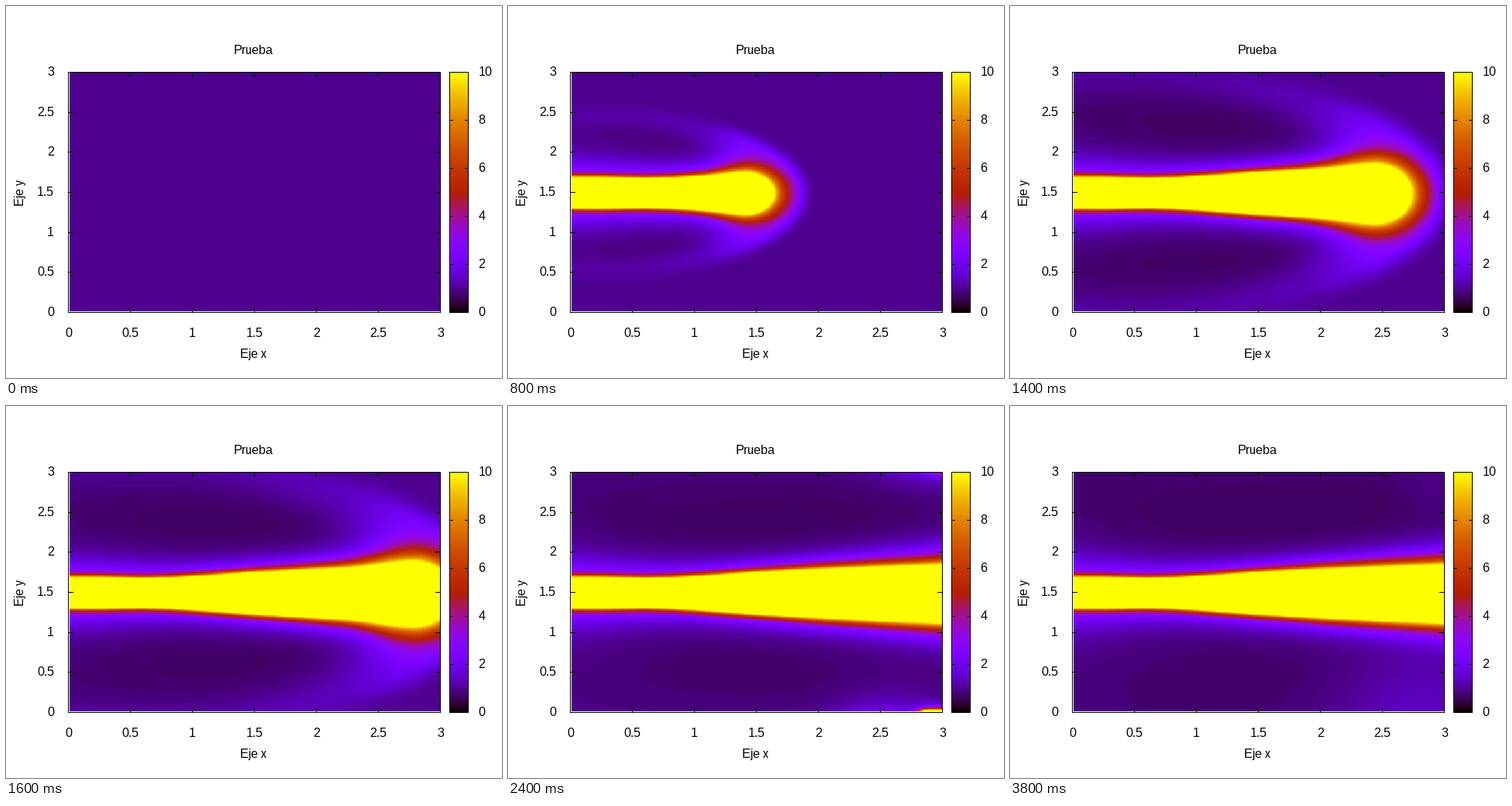
Recreate the animation shown at these times as a matplotlib script. Size 640x480 px, loop 4 s.

```python
import numpy as np
import matplotlib.pyplot as plt
from matplotlib.animation import FuncAnimation
from matplotlib.colors import ListedColormap

FRAMES, STEP = 20, 200
CELLS = 199
LEFT, RIGHT, TOP, BOTTOM = 80.5, 560.5, 85.5, 395.5
X0, X1, Y0, Y1 = 82, 560, 86, 394

plt.rcParams["font.family"] = "Liberation Sans"
plt.rcParams["text.hinting"] = "native"
plt.rcParams["text.hinting_factor"] = 1

# Black, violet, red, yellow: r = sqrt(v), g = v^3, b = sin(2 pi v)
level = np.linspace(0, 1, 128)
blue = np.clip(np.sin(2 * np.pi * level), 0, 1)
cmap = ListedColormap(np.column_stack([np.sqrt(level), level**3, blue]))

mid = (np.arange(CELLS) + 0.5) / CELLS
x, y = np.meshgrid(mid * (X1 - X0), Y0 + mid * (Y1 - Y0))
side = y - (240.8 + x / 300)
dy = np.abs(side)


def smooth(t):
    t = np.clip(t, 0, 1)
    return t * t * (3 - 2 * t)


def bump(u, width):
    return np.exp(-(u / width) ** 2)


def jet_width(px):
    return np.interp(px, [0, 40, 95, 130, 160, 240, 320, 400, 478],
                     [20.3, 20.3, 19.3, 20, 21.5, 27, 31.5, 35, 38])


def corners(n):
    """Wall flare on the outflow side and the slow glow that follows it."""
    to_right = (X1 - X0) - x
    from_top, from_bottom = y - Y0, Y1 - y
    flare = bump(n - 11.8, 1.1)
    low = 16 * np.exp(-from_bottom / 3) / (1 + np.exp((to_right - 27) / 4))
    low += 1.1 * np.exp(-from_bottom / 18) * bump(x - 410, 70)
    high = 3 * np.exp(-from_top / 3) * bump(to_right, 18)
    high += 1.2 * np.exp(-from_top / 16) * bump(to_right, 80)
    late = smooth((n - 11) / 5)
    glow = 0.65 * bump(x - 450, 110) * bump(from_bottom - 10, 65)
    top_y = 135 - 10 * (n - 16)
    top_amp = 0.45 - 0.08 * max(n - 16, 0)
    glow += top_amp * bump(to_right, 60) * bump(y - top_y, 45)
    return flare * (low + high) + late * glow


def field(n):
    if n == 0:
        return np.ones_like(x)
    # Bow shock: half ellipse that grows ahead of the jet
    front = 62.5 * n + 61 * (1 - np.exp(-1.5 * n))
    half = 21 * n + 35 * (1 - np.exp(-1.9 * n))
    start = 10 * n
    u = np.maximum(x - start, 0) / (front - start)
    q = np.hypot(u, dy / half)
    ahead = u / np.maximum(q, 1e-6)

    # Jet with a swollen, rounded head
    cap = 24 + 3.6 * n
    head = front - (20 * np.sqrt(n) + 9) - cap
    swell = 0.09 * n * n
    spread = 18 + 4.5 * n
    height = jet_width(head) + swell
    near = np.where(x > head, 1, bump(x - head, spread))
    body = dy - jet_width(x) - swell * bump(x - head, spread)
    nose = np.hypot((x - head) * height / cap, dy) - height
    d = np.maximum(np.where(x > head, nose, body), 0)

    # Cocoon around the jet
    late = smooth((n - 6) / 8)
    inner = 0.53 + (0.1 + 0.1 * late) * np.exp(-x / 140)
    inner = inner + 0.1 * late * smooth((side - 30) / 60)
    outer = np.interp(n, [8, 12, 16], [0.97, 0.92, 0.8])
    reach = min(0.9 * half, 170)
    behind = np.where(x > head, 1, bump(x - head, 1.7 * spread))
    mix = np.maximum(behind, np.minimum((dy / reach) ** 3, 1))
    base = inner + (outer - inner) * mix

    # Shocked shell, fading once it has left the box
    fade = np.clip((12 - n) / 4, 0, 1)
    base += fade * (0.25 + 0.9 * ahead**2) * bump(q - 0.86, 0.16)

    # Steep skin and soft halo, 10 at the jet's edge
    steady = 3 + 7 * (x / (X1 - X0)) ** 2
    steep = steady + near * np.maximum(7 + 0.14 * n * n - steady, 0)
    soft = 20 - 5 * np.sin(np.pi * x / (X1 - X0)) * (1 - near)
    v = base + (10 - base) * (0.33 * np.exp(-d / soft)
                              + 0.67 * np.exp(-d / steep))
    edge = smooth((1.02 - q) / (0.28 - 0.16 * ahead))
    return 1 + (v - 1) * edge + corners(n)


fig = plt.figure(figsize=(8, 6), dpi=80, facecolor="white")
ax = fig.add_axes([0, 0, 1, 1])


def line(xs, ys):
    ax.plot(xs, ys, color="black", lw=0.9, solid_capstyle="projecting",
            solid_joinstyle="miter", snap=False, zorder=3)


def frame(l, r, t, b):
    line([l, r, r, l, l], [t, t, b, b, t])


def label(px, py, text, ha="center", **kw):
    ax.text(px, py, text, ha=ha, va="baseline", fontsize=14.4,
            color="black", **kw)


def picture(data, extent):
    return ax.imshow(data, cmap=cmap, vmin=0, vmax=10, extent=extent,
                     interpolation="nearest", aspect="auto", zorder=1)


image = picture(np.ones_like(x), (X0, X1, Y1, Y0))
ramp = np.linspace(10, 0, 310)[:, None]
picture(ramp, (572, 597, 396, 85))
ax.set_xlim(0, 640)
ax.set_ylim(480, 0)
ax.axis("off")

frame(LEFT, RIGHT, TOP, BOTTOM)
frame(572.5, 596.5, TOP, BOTTOM)

for k in range(7):
    name = f"{k / 2:g}"
    tx = LEFT + 80 * k
    ty = np.floor(BOTTOM - 310 / 6 * k) + 0.5
    line([tx, tx], [BOTTOM, BOTTOM - 6])
    line([tx, tx], [TOP, TOP + 6])
    line([LEFT, LEFT + 6], [ty, ty])
    line([RIGHT, RIGHT - 6], [ty, ty])
    label(tx, 427, name)
    label(62, ty + 4.5, name, ha="right")

for k in range(6):
    ty = BOTTOM - 62 * k
    line([572.5, 576.5], [ty, ty])
    line([596.5, 592.5], [ty, ty])
    label(609.5, ty + 4.5, str(2 * k), ha="left")

label(319, 62, "Prueba")
label(319, 454, "Eje x")
label(23.5, 241, "Eje y", rotation=90, rotation_mode="anchor")


def draw(n):
    image.set_data(field(n))
    return [image]


anim = FuncAnimation(fig, draw, frames=FRAMES, interval=STEP, repeat=True,
                     repeat_delay=0, init_func=lambda: draw(0))
plt.show()
```
